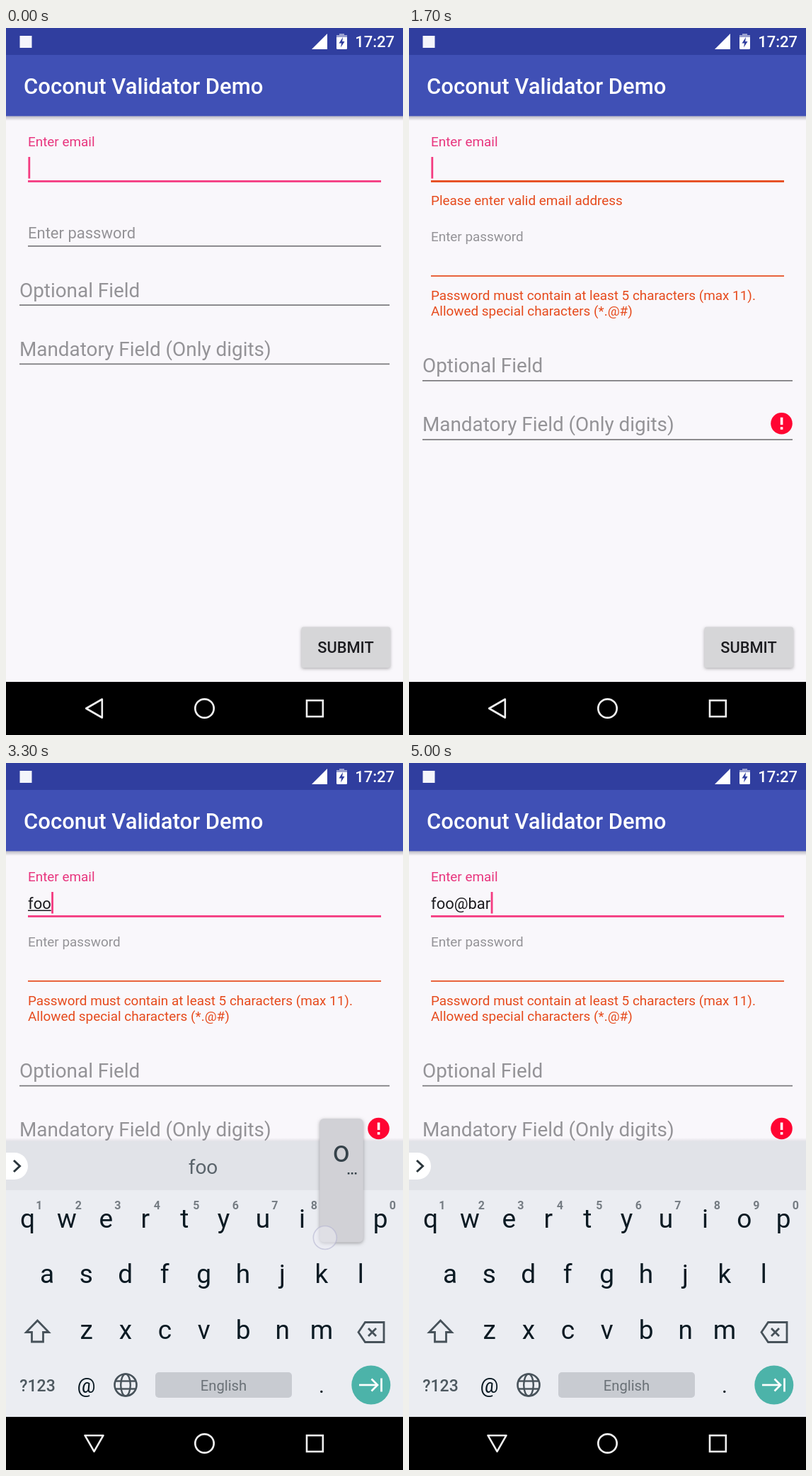
An HTML page with a canvas that plays this animation: 561 px wide and 998 px high, repeating every 5300 ms.

```html
<!DOCTYPE html>
<html lang="en">
<head>
<meta charset="utf-8">
<title>Validator demo</title>
<style>
html, body { margin: 0; width: 100%; height: 100%; overflow: hidden; background: #f9f7fb; }
canvas { display: block; width: 561px; height: 998px; }
</style>
</head>
<body>
<canvas id="stage"></canvas>
<script>
const W = 561, H = 998, LOOP = 5300, STEP = 100;
const canvas = document.getElementById('stage');
const ctx = canvas.getContext('2d');
const dpr = window.devicePixelRatio || 1;
canvas.width = W * dpr;
canvas.height = H * dpr;

const PINK = '#f43b80', ERROR = '#e64a1c', HINT = '#949397', LINE = '#7a797c';
const ICON = '#47525a', KEY = '#0b1a23', PAPER = '#f9f7fb';
const SMALL = 18.9, BODY = 22, LARGE = 27.87;

// Layout shifts caused by the two error messages
const EMAIL_SHIFT = 42.2, PASS_SHIFT = 64.5;
const ERRORS_AT = 1000, KEYBOARD_AT = 2100, CLEAR_AT = 2900;

const KEY_STEP = 55.4;
const ROWS = [
  { keys: 'qwertyuiop', x: 30.6, y: 643 },
  { keys: 'asdfghjkl', x: 58, y: 721.5 },
  { keys: 'zxcvbnm', x: 113.6, y: 800.5 }
];

// Each tap: key, press, commit and popup end times, finger offset
const TAPS = [
  { key: 'f', down: 2800, up: 2900, end: 3000, dx: -4, dy: 18 },
  { key: 'o', down: 3000, up: 3100, end: 3200, dx: -23, dy: 27 },
  { key: 'o', down: 3200, up: 3300, end: 3500, dx: -23, dy: 27 },
  { key: '@', down: 4000, up: 4100, end: 4200, dx: -4, dy: 14 },
  { key: 'b', down: 4400, up: 4500, end: 4600, dx: -4, dy: 18 },
  { key: 'a', down: 4600, up: 4700, end: 4800, dx: 4, dy: 18 },
  { key: 'r', down: 4800, up: 4900, end: 5000, dx: -4, dy: 18 }
];

const clamp = v => Math.max(0, Math.min(1, v));
const mix = (a, b, p) => a + (b - a) * p;
const easeOut = p => 1 - (1 - p) * (1 - p);
const errorAlpha = t => easeOut(clamp((t - ERRORS_AT) / 130));

function text(str, x, y, size, color, align = 'left', weight = 400) {
  ctx.font = `${weight} ${size}px Roboto, sans-serif`;
  ctx.textAlign = align;
  ctx.fillStyle = color;
  ctx.fillText(str, x, y);
}

function rect(x, y, w, h, color) {
  ctx.fillStyle = color;
  ctx.fillRect(x, y, w, h);
}

function round(x, y, w, h, r, color) {
  ctx.beginPath();
  ctx.roundRect(x, y, w, h, r);
  ctx.fillStyle = color;
  ctx.fill();
}

function path(points, closed) {
  ctx.beginPath();
  points.forEach(([x, y]) => ctx.lineTo(x, y));
  if (closed) ctx.closePath();
}

function stroke(points, color, width, closed = false) {
  path(points, closed);
  ctx.strokeStyle = color;
  ctx.lineWidth = width;
  ctx.stroke();
}

function fill(points, color) {
  path(points, true);
  ctx.fillStyle = color;
  ctx.fill();
}

function disc(x, y, r, color) {
  ctx.beginPath();
  ctx.arc(x, y, r, 0, Math.PI * 2);
  ctx.fillStyle = color;
  ctx.fill();
}

function ring(x, y, rx, ry, color, width) {
  ctx.beginPath();
  ctx.ellipse(x, y, rx, ry, 0, 0, Math.PI * 2);
  ctx.strokeStyle = color;
  ctx.lineWidth = width;
  ctx.stroke();
}

function shade(y, h, from, to) {
  const g = ctx.createLinearGradient(0, y, 0, y + h);
  g.addColorStop(0, from);
  g.addColorStop(1, to);
  rect(0, y, W, h, g);
}

function withState(draw) {
  ctx.save();
  draw();
  ctx.restore();
}

function shadow(color, blur, dy) {
  ctx.shadowColor = color;
  ctx.shadowBlur = blur * dpr;
  ctx.shadowOffsetY = dy * dpr;
}

function touch(x, y) {
  disc(x, y, 16.5, 'rgba(238,238,245,0.5)');
  ring(x, y, 16.5, 16.5, 'rgba(180,180,208,0.6)', 1.6);
}

function drawBars() {
  rect(0, 38, W, 86.5, '#4050b5');
  shade(124.5, 6.5, 'rgba(60,60,80,0.32)', 'rgba(60,60,80,0)');
  rect(0, 0, W, 38, '#303e9f');
  text('Coconut Validator Demo', 25, 93, 31, '#fff', 'left', 500);

  rect(19.5, 11, 17, 17, '#f4f5fb');
  fill([[432, 30], [454, 30], [454, 8]], '#fff');
  rect(471, 8, 7, 3, '#9aa1d0');
  rect(467, 10, 15, 4, '#9aa1d0');
  round(467, 13, 15, 17, [0, 0, 1.5, 1.5], '#fff');
  fill([[476, 13], [470.5, 21.5], [474, 21.5], [473, 27.5], [478.5, 19], [475.2, 19]], '#303e9f');
  text('17:27', 549, 27, 22, '#fff', 'right', 500);
}

function drawNav(open) {
  rect(0, 923, W, 75, '#000');
  withState(() => {
    ctx.translate(124.5, 960.5);
    ctx.rotate(-Math.PI / 2 * open);
    ctx.lineJoin = 'round';
    stroke([[-11.3, 0], [11.3, -13], [11.3, 13]], '#f0f0f0', 2.6, true);
  });
  ring(280.5, 960.5, 13.2, 13.2, '#f0f0f0', 2.7);
  ctx.strokeStyle = '#f0f0f0';
  ctx.lineWidth = 2.6;
  ctx.strokeRect(425, 949.2, 22.8, 22.8);
}

function drawButton(t) {
  withState(() => {
    shadow('rgba(0,0,0,0.3)', 4, 1.6);
    round(417.5, 845.5, 125.5, 57.5, 3, '#d6d6d8');
  });
  if (t >= 900 && t < 1500) {
    withState(() => {
      ctx.beginPath();
      ctx.roundRect(417.5, 845.5, 125.5, 57.5, 3);
      ctx.clip();
      const radius = mix(20, 60, (t - 900) / 200);
      const alpha = 0.065 * clamp((1500 - t) / 400);
      disc(481.5, 875, radius, `rgba(0,0,0,${alpha})`);
    });
  }
  text('SUBMIT', 480, 882, 21.8, '#1b1b1f', 'center', 500);
  if (t >= 900 && t < 1000) touch(481.5, 875);
}

function cursorOn(t) {
  if (t < CLEAR_AT) return t < 100 || t >= 2600 || Math.floor((t - 100) / 500) % 2 === 1;
  return t < 3800 || t >= 4100;
}

function drawEmail(t, typed) {
  const failed = t >= ERRORS_AT && t < CLEAR_AT;
  text('Enter email', 31, 166.5, SMALL, '#e8357e');
  text(typed, 31, 206, BODY, '#1c1b1f');
  const width = ctx.measureText(typed).width;
  if (typed && !typed.includes('@')) rect(31, 207.5, width, 1.5, '#1c1b1f');
  if (cursorOn(t)) rect(31.4 + width, 182, 2.8, 30.5, PINK);
  rect(31, 215, 499, 2.8, failed ? ERROR : PINK);

  ctx.globalAlpha = t < CLEAR_AT ? errorAlpha(t) : clamp((CLEAR_AT + 200 - t) / 200);
  text('Please enter valid email address', 31, 249.5, SMALL, ERROR);
  ctx.globalAlpha = 1;
}

function drawFields(t) {
  const failed = t >= ERRORS_AT;
  const top = failed && t < CLEAR_AT + 200 ? EMAIL_SHIFT : 0;
  const lower = top + (failed ? PASS_SHIFT : 0);
  const p = clamp((t - ERRORS_AT) / 210);

  const size = mix(BODY, SMALL, clamp(p * 2));
  text('Enter password', 31, mix(296.5, 258.7, p) + top, size, HINT);
  rect(31, 307 + top, 499, 1.7, failed ? ERROR : LINE);
  if (failed) {
    ctx.globalAlpha = errorAlpha(t);
    text('Password must contain at least 5 characters (max 11).', 31, 341.5 + top, SMALL, ERROR);
    text('Allowed special characters (*.@#)', 31, 363.5 + top, SMALL, ERROR);
    ctx.globalAlpha = 1;
  }

  text('Optional Field', 19, 379.5 + lower, LARGE, HINT);
  rect(19, 390.3 + lower, 523, 1.7, LINE);
  text('Mandatory Field (Only digits)', 19, 462.5 + lower, LARGE, HINT);
  rect(19, 473.5 + lower, 523, 1.7, LINE);
  if (failed) {
    const y = 451.5 + lower;
    disc(526.5, y, 15.3, '#ff0532');
    rect(524.8, y - 8.5, 3.6, 10.5, '#fff');
    rect(524.8, y + 5, 3.6, 3.6, '#fff');
  }
}

function drawFunctionKeys() {
  const arrow = [[44.5, 787], [28.5, 803.5], [36.5, 803.5], [36.5, 817], [52.5, 817], [52.5, 803.5], [60.5, 803.5]];
  stroke(arrow, ICON, 2.8, true);
  stroke([[498, 803.5], [507.5, 789.5], [534, 789.5], [534, 817.5], [507.5, 817.5]], ICON, 2.8, true);
  stroke([[512, 798], [523, 809]], ICON, 2.8);
  stroke([[523, 798], [512, 809]], ICON, 2.8);

  text('?123', 44.5, 887, 23, '#4d585f', 'center', 500);
  text('@', 113.5, 889, 29, KEY, 'center');
  ring(169, 878, 15.5, 15.5, ICON, 2.6);
  ring(169, 878, 6.8, 15.5, ICON, 2.4);
  for (const dy of [-5.5, 5.5]) stroke([[154.5, 878 + dy], [183.5, 878 + dy]], ICON, 2.4);
  round(211, 860, 193, 36, 5, '#c8cbd1');
  text('English', 307.5, 886, 20.2, '#6a7177', 'center');
  text('.', 446, 889, 30, KEY, 'center');

  disc(515.8, 878, 27.5, '#4cb3a9');
  stroke([[499, 878], [525, 878]], '#fff', 2.7);
  stroke([[516.5, 869.5], [525, 878], [516.5, 886.5]], '#fff', 2.7);
  stroke([[530.5, 868.5], [530.5, 887.5]], '#fff', 2.7);
}

function drawKeyboard(suggestion) {
  shade(529, 5, 'rgba(90,95,110,0)', 'rgba(90,95,110,0.14)');
  rect(0, 534, W, 389, '#ebedf2');
  rect(0, 534, W, 69, '#e1e3e8');
  round(-20, 550, 51, 38, 19, '#fff');
  stroke([[11, 561], [19.5, 569], [11, 577]], '#2b363c', 3);
  text(suggestion, 278.5, 580, 28, '#5a646b', 'center');

  for (const row of ROWS) {
    [...row.keys].forEach((key, i) => {
      text(key, row.x + i * KEY_STEP, row.y + 12.5, 37, KEY, 'center');
    });
  }
  for (let i = 0; i < 10; i++) {
    text((i + 1) % 10, 46.8 + i * 55.5, 630, 16, '#757c83', 'center', 700);
  }
  drawFunctionKeys();
}

function keyCenter(key) {
  const row = ROWS.find(r => r.keys.includes(key));
  return row ? [row.x + row.keys.indexOf(key) * KEY_STEP, row.y] : [113.5, 879];
}

function drawTap(tap, t) {
  const [x, y] = keyCenter(tap.key);
  withState(() => {
    shadow('rgba(0,0,0,0.32)', 5, 1.5);
    round(x - 30.5, y - 141, 61.5, 174.5, 6, '#d1d1d6');
  });
  text(tap.key, x, y - 80.5, 42, '#35424a', 'center');
  if ('oar'.includes(tap.key)) {
    for (let i = 0; i < 3; i++) rect(x + 9 + i * 5, y - 65, 2.6, 2.6, '#35424a');
  }
  if (t < tap.up + STEP) touch(x + tap.dx, y + tap.dy);
}

function render(t) {
  ctx.setTransform(dpr, 0, 0, dpr, 0, 0);
  rect(0, 0, W, H, PAPER);
  const typed = TAPS.filter(tap => t >= tap.up).map(tap => tap.key).join('');
  drawEmail(t, typed);
  drawFields(t);
  drawButton(t);
  drawBars();

  const open = easeOut(clamp((t - KEYBOARD_AT + 50) / 200));
  if (open > 0) {
    withState(() => {
      ctx.globalAlpha = open;
      ctx.translate(0, 60 * (1 - open));
      drawKeyboard(typed.includes('@') ? '' : typed);
    });
  }
  drawNav(open);
  const tap = TAPS.find(k => t >= k.down && t < k.end);
  if (tap) drawTap(tap, t);
}

// The picture advances in tenths of a second
const start = performance.now();
function tick() {
  const t = (performance.now() - start) % LOOP;
  render(Math.floor(t / STEP) * STEP);
  requestAnimationFrame(tick);
}
tick();
</script>
</body>
</html>
```
